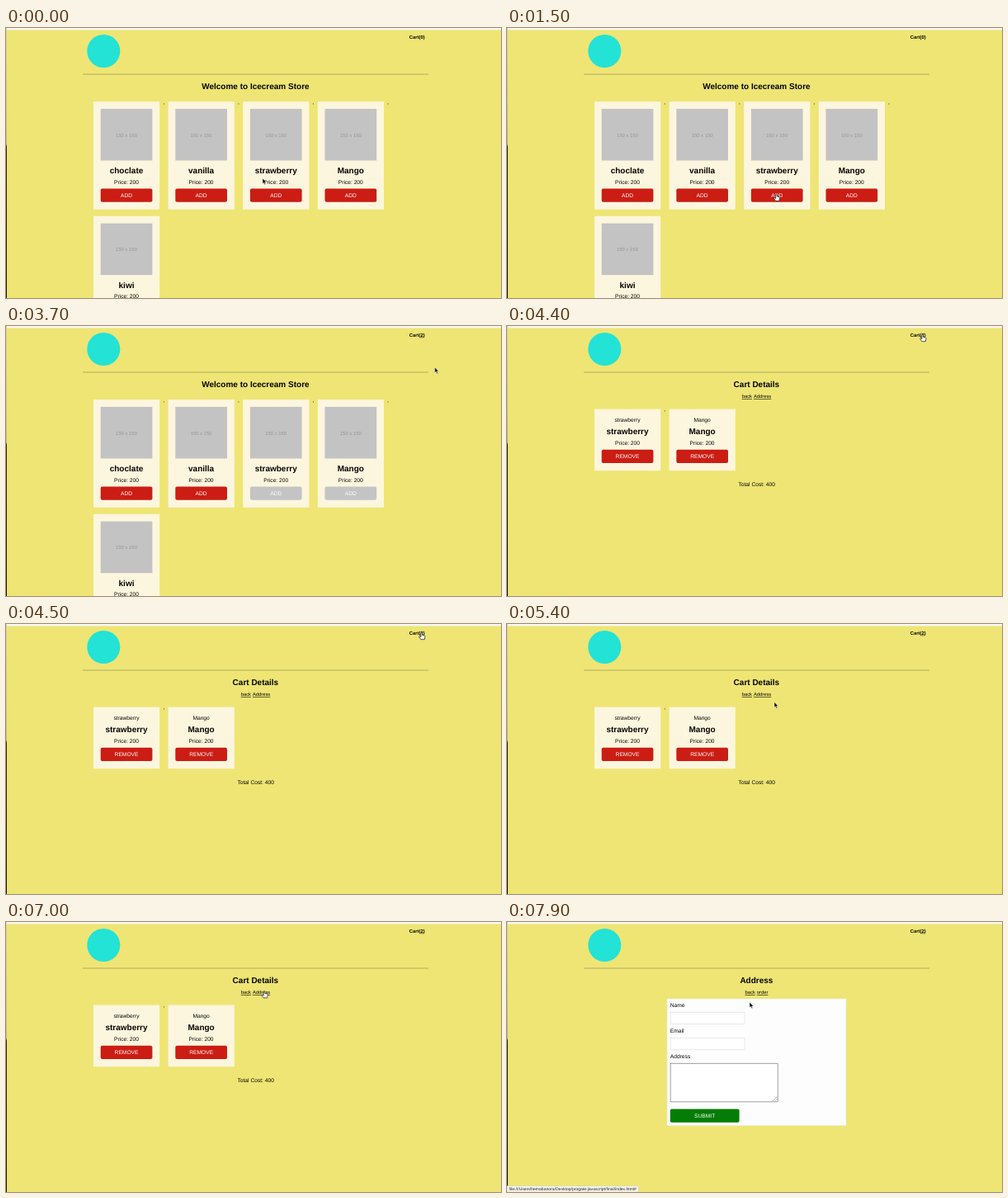
Recreate the animation shown at these times as an HTML page. Size 600 by 327 pixels, loop 8 s.

```html
<!DOCTYPE html>
<html lang="en">
<head>
<meta charset="utf-8">
<title>Icecream Store</title>
<style>
  html, body { margin: 0; width: 100%; height: 100%; overflow: hidden; background: #eee574; }
  svg { display: block; width: 100%; height: 100%; }
  text {
    font: 6.667px "Liberation Sans", Arial, sans-serif;
    fill: #050505;
    text-rendering: geometricPrecision;
  }
  .mid { text-anchor: middle; }
  .h2 { font-size: 10px; font-weight: bold; }
  .link { font-size: 5.83px; text-decoration: underline; }
  .cart { font-size: 5.83px; font-weight: bold; }
  .size { font-size: 5.9px; fill: #969696; }
  .label { fill: #fff; }
  .status { font-size: 5.05px; fill: #222; }
  .some { text-decoration: underline; }
  .card { fill: #fdf6de; }
  .pic { fill: #c3c3c3; }
  .btn { fill: #cb1d14; }
  .btn.off { fill: #c4c4c4; }
  .btn.go { fill: #047c05; }
  .field { fill: #fff; stroke: #dcdcdc; stroke-width: .6; }
</style>
</head>
<body>
<svg viewBox="0 0 600 327" preserveAspectRatio="none">
  <defs>
    <linearGradient id="edge" x2="0" y2="1">
      <stop offset="0" stop-color="#d9d3a0"/>
      <stop offset=".43" stop-color="#b9b58c"/>
      <stop offset=".44" stop-color="#26251c"/>
      <stop offset="1" stop-color="#111"/>
    </linearGradient>
  </defs>
  <rect width="600" height="327" fill="#eee574"/>
  <rect width="600" height="2.4" fill="#f7f7f4"/>
  <rect width="1" height="327" fill="url(#edge)"/>
  <circle cx="118.3" cy="28" r="20" fill="#22e3d5"/>
  <rect x="93" y="55.5" width="419" height="1" fill="#b3ac62"/>
  <text class="cart" x="488.8" y="12.6">Cart(<tspan id="count">0</tspan>)</text>

  <g id="home"></g>
  <g id="basket"></g>
  <g id="address"></g>

  <g id="status">
    <path d="M0 319.5H157.5a2 2 0 0 1 2 2V327H0Z" fill="#f6f5ee" stroke="#cfc98e" stroke-width=".5"/>
    <text class="status" x="2.6" y="325.1">file:///Users/hemabanora/Desktop/progate-javascript/final/index.html#</text>
  </g>

  <g id="pointer">
    <path id="arrow" d="M0 0V6.6L1.5 5.3L2.6 7.8L3.8 7.3L2.7 4.9H4.7Z"
      fill="#080808" stroke="#fff" stroke-width=".5"/>
    <path id="hand" d="M-.8 .5Q0 -.5 .8 .5V3L3.6 3.6Q4.3 3.9 4.2 5L3.6 8.4H-.9L-2.9 5.4Q-3 4.3 -2 4.6L-.8 5.5Z"
      fill="#fff" stroke="#111" stroke-width=".7" stroke-linejoin="round"/>
  </g>
</svg>
<script>
const LOOP = 8000, STEP = 100;
const $ = id => document.getElementById(id);

const text = (x, y, str, cls = "") => `<text x="${x}" y="${y}" class="${cls}">${str}</text>`;
const rect = (x, y, w, h, cls, r = 0, id = "") =>
  `<rect id="${id}" x="${x}" y="${y}" width="${w}" height="${h}" rx="${r}" class="${cls}"/>`;

const button = (x, y, w, str, cls = "", id = "") =>
  rect(x, y, w, 16.2, "btn " + cls, 2, id) + text(x + w / 2, y + 10.6, str, "mid label");

const column = i => 106 + 90.6 * i;

function product(name, i, y) {
  const x = column(i % 4), c = x + 40;
  return rect(x, y, 80.2, 130.7, "card")
    + rect(x + 8.7, y + 8.8, 62.7, 62.6, "pic")
    + text(c, y + 42.6, "150 x 150", "mid size")
    + text(c, y + 87, name, "mid h2")
    + text(c, y + 99.5, "Price: 200", "mid")
    + button(x + 8.7, y + 105.4, 62.7, "ADD", "", "add" + i)
    + (i < 4 ? text(x + 84.3, y + 2.6, ",") : "");
}

function item(name, i) {
  const x = column(i), c = x + 40;
  return rect(x, 100.6, 80.2, 74.6, "card")
    + text(c, 116, name, "mid")
    + text(c, 131.4, name, "mid h2")
    + text(c, 144.2, "Price: 200", "mid")
    + button(x + 8.7, 149.8, 62.7, "REMOVE")
    + (i ? "" : text(x + 84.3, 103.2, ","));
}

const heading = str => text(302.4, 74.4, str, "mid h2");

$("home").innerHTML = heading("Welcome to Icecream Store")
  + ["choclate", "vanilla", "strawberry", "Mango", "kiwi"]
    .map((name, i) => product(name, i, i < 4 ? 89.1 : 227.8)).join("");

$("basket").innerHTML = heading("Cart Details")
  + text(284.7, 87.1, "back", "link") + text(298.9, 87.1, "Address", "link")
  + ["strawberry", "Mango"].map(item).join("")
  + text(302.7, 193.5, "Total Cost: 400", "mid");

$("address").innerHTML = heading("Address")
  + text(288.5, 87.1, "back", "link") + text(302.8, 87.1, "order", "link")
  + `<rect x="194" y="93" width="217" height="153.7" fill="#fdfdfd" stroke="#e9e7cf" stroke-width=".6"/>`
  + text(197.8, 103.2, "Name") + rect(198.2, 109.2, 89.8, 14.4, "field")
  + text(197.8, 134.3, "Email") + rect(198.2, 140.4, 89.8, 14.4, "field")
  + text(197.8, 165.4, "Address")
  + `<rect x="198.2" y="171.3" width="130" height="46.5" fill="#fff" stroke="#8b8b8b" stroke-width=".8"/>
     <path d="M322 217L327.5 211.5M324.7 217L327.5 214.2" stroke="#777" stroke-width=".6"/>`
  + button(197.8, 226.6, 83.8, "SUBMIT", "go");

// Pointer stops: time, x, y
const stops = [
  [0, 311, 182], [400, 404, 198], [600, 400, 203], [900, 330, 208], [1300, 326.5, 201],
  [1900, 326.5, 201], [2600, 417, 201], [3000, 417, 201], [3600, 519.7, 50], [3800, 519.7, 50],
  [4300, 503.7, 10.3], [4800, 503.7, 10.3], [5200, 336, 104], [5300, 336, 104],
  [5500, 312, 85], [5700, 291, 85], [6000, 272.5, 139], [6200, 272.5, 139],
  [6600, 330, 29], [6900, 313, 83.5], [7700, 313, 83.5], [7800, 397, 95], [7900, 294, 97],
  [8000, 294, 97]
];

// Clickable boxes per view: left, top, right, bottom
const cartLink = [488, 7, 509, 15];
const hot = {
  home: [cartLink, ...[0, 1, 2, 3].map(i => [column(i) + 8, 194, column(i) + 72, 211])],
  basket: [cartLink, [284, 81, 297, 89], [299, 81, 321, 89]],
  address: [cartLink, [288, 81, 301, 89], [303, 81, 317, 89]]
};

const statusTimes = [[4600, 5400], [5600, 6300], [7200, LOOP]];

function pointerAt(t) {
  const i = stops.findIndex(s => s[0] > t);
  const [t0, x0, y0] = stops[i - 1], [t1, x1, y1] = stops[i];
  const u = (t - t0) / (t1 - t0), e = u * u * (3 - 2 * u);
  return [x0 + (x1 - x0) * e, y0 + (y1 - y0) * e];
}

const show = (id, on) => $(id).setAttribute("display", on ? "inline" : "none");

function draw(t) {
  const view = t < 4400 ? "home" : t < 7100 ? "basket" : "address";
  for (const id in hot) show(id, id === view);

  const count = (t >= 1700) + (t >= 2900);
  $("count").textContent = count;
  $("count").setAttribute("class", count ? "some" : "");
  $("add2").classList.toggle("off", count > 0);
  $("add3").classList.toggle("off", count > 1);

  show("status", statusTimes.some(([a, b]) => t >= a && t < b));

  const [x, y] = pointerAt(t);
  const over = hot[view].some(([l, top, r, b]) => x >= l && x <= r && y >= top && y <= b);
  $("pointer").setAttribute("transform", `translate(${x} ${y})`);
  show("hand", over);
  show("arrow", !over);
}

const start = performance.now();
function tick() {
  const t = (performance.now() - start) % LOOP;
  draw(Math.floor(t / STEP) * STEP);
  requestAnimationFrame(tick);
}
tick();
</script>
</body>
</html>
```
